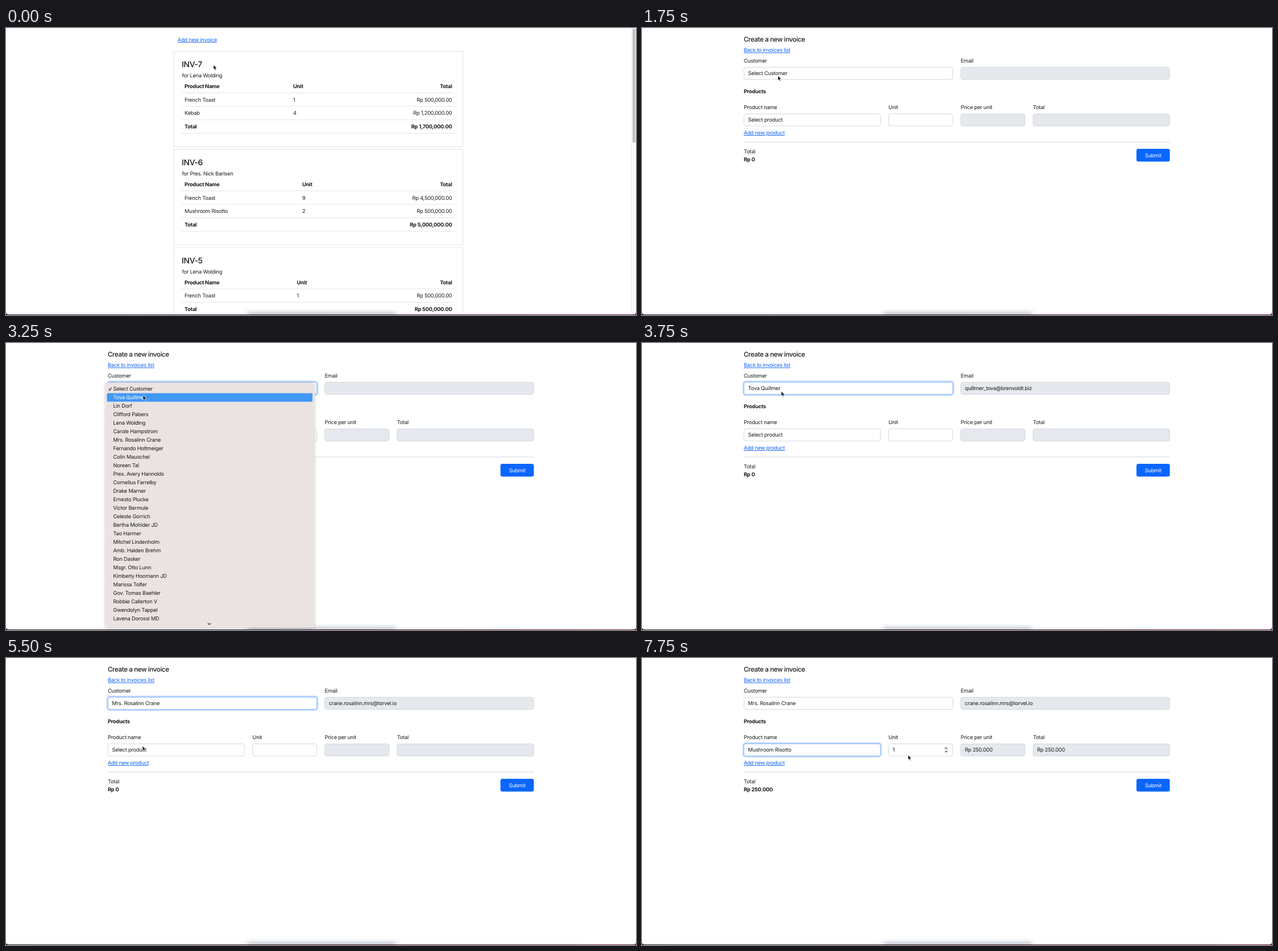
An HTML page that plays this animation: 1108x506 px, repeating every 8 s.

```html
<!DOCTYPE html>
<html lang="en">
<head>
<meta charset="utf-8">
<title>Invoices</title>
<style>
  html, body { margin: 0; width: 100%; height: 100%; overflow: hidden; background: #fff; }
  svg { display: block; width: 100%; height: 100%; }
  text { font: 400 9.25px Inter, "Liberation Sans", sans-serif; letter-spacing: -.023em;
         fill: #16191c; white-space: pre; text-rendering: geometricPrecision; }
  .b { font-weight: 700; }
  .link { fill: #0a60f8; text-decoration: underline; }
  .h4 { font-size: 13.9px; font-weight: 500; }
  .h5 { font-size: 11.6px; font-weight: 500; letter-spacing: -.034em; }
  .w { fill: #fff; }
  .end { text-anchor: end; }
  .mid { text-anchor: middle; }
</style>
</head>
<body>
<svg id="stage" viewBox="0 0 1108 506">
  <defs>
    <filter id="blur" x="-20%" y="-200%" width="140%" height="500%"><feGaussianBlur stdDeviation="5 3"/></filter>
    <filter id="shade" x="-10%" y="-10%" width="120%" height="120%">
      <feDropShadow dx="0" dy="1" stdDeviation="2.2" flood-opacity=".26"/>
    </filter>
    <clipPath id="list"><rect width="1108" height="489.5"/></clipPath>
    <linearGradient id="edge"><stop stop-color="#26222a"/><stop offset="1" stop-color="#6b2038"/></linearGradient>
  </defs>
  <g id="page"></g>
  <rect x="424" y="500" width="262" height="12" fill="#b9bfcb" opacity=".75" filter="url(#blur)"/>
  <path d="M0 501Q0 505 5 505H1103Q1108 505 1108 501V506H0Z" fill="url(#edge)"/>
  <g id="menu"></g>
  <g id="pointer"></g>
</svg>
<script>
const STEP = 250, LOOP = 8000;

const customers = ["Select Customer", "Tova Quillmer", "Lin Dorf", "Clifford Pabers", "Lena Wolding",
  "Carole Hampstrom", "Mrs. Rosalinn Crane", "Fernando Holtmeiger", "Colin Mauschel", "Noreen Tal",
  "Pres. Avery Hannolds", "Cornelius Farrelby", "Drake Marner", "Ernesto Plucke", "Victor Bermule",
  "Celeste Gorrich", "Bertha Mohlder JD", "Tao Harmer", "Mitchel Lindenholm", "Amb. Halden Brehm",
  "Ron Dasker", "Msgr. Otto Lunn", "Kimberly Hoomann JD", "Marissa Tolfer", "Gov. Tomas Baehler",
  "Robbie Callerton V", "Gwendolyn Tappel", "Lavena Dorossi MD", "Darnell Hulow"];
const products = ["Select product", "Mushroom Risotto", "French Toast", "Kebab", "Peking Duck", "Stinky Tofu",
  "Pork Sausage Roll", "Chicken Parm", "Barbecue Ribs", "Ebiten maki", "Pho", "Tuna Sashimi", "Pasta Carbonara",
  "Poutine", "Pork Belly Buns", "Scotch Eggs", "Chicken Fajitas", "Salmon Nigiri", "Linguine with Clams",
  "Pizza", "Cheeseburger", "Tacos"];

// [step, x, y] of the pointer tip
const moves = [[0, 365, 65], [1, 350, 42], [2, 336, 20], [4, 320, 32], [5, 285, 52], [6, 252, 72], [7, 239, 84],
  [8, 239, 82], [13, 241, 92], [14, 243, 90], [15, 245, 85], [17, 244, 82], [18, 242, 118], [19, 240, 155],
  [24, 239, 158], [25, 238, 162], [27, 238, 168], [28, 238, 176], [29, 300, 174], [30, 400, 172], [31, 468, 171]];

const menus = [
  { from: 9, to: 14, items: customers, top: 70, right: 542.5, checked: 0 },
  { from: 17, to: 22, items: customers, top: 55, right: 542.5, checked: 1 },
  { from: 26, to: 29, items: products, top: 152.3, right: 415, checked: 0 }];

const text = (x, y, s, cls = "") => `<text x="${x}" y="${y}" class="${cls}">${s}</text>`;
const rect = (x, y, w, h, attrs) => `<rect x="${x}" y="${y}" width="${w}" height="${h}" ${attrs}/>`;
const rule = (x1, x2, y, color = "#dee2e6") => `<path d="M${x1} ${y}H${x2}" stroke="${color}" stroke-width=".9"/>`;

function card(y, id, who, unitX, rows, total) {
  const line = (i, cells, cls) => {
    const base = y + 65 + i * 23.7;
    return text(314, base, cells[0], cls) + text(unitX, base, cells[1], cls) +
      text(784.5, base, cells[2], cls + " end") + rule(309, 789.5, base + 8.4);
  };
  return rect(295.3, y + .5, 508.2, 44.5 + 23.7 * (rows.length + 2) + 28.5, 'fill="#fff" stroke="#dee0e2" stroke-width=".9"') +
    text(309, y + 28, id, "h4") + text(309.5, y + 46.3, "for " + who) +
    line(0, ["Product Name", "Unit", "Total"], "b") +
    rows.map((r, i) => line(i + 1, r, "")).join("") +
    line(rows.length + 1, ["Total", "", total], "b");
}

function listPage() {
  const toast = ["French Toast", 1, "Rp 500,000.00"];
  return text(302, 23.8, "Add new invoice", "link") +
    card(41, "INV-7", "Lena Wolding", 505, [toast, ["Kebab", 4, "Rp 1,200,000.00"]], "Rp 1,700,000.00") +
    card(213.8, "INV-6", "Pres. Nick Barlsen", 521,
      [["French Toast", 9, "Rp 4,500,000.00"], ["Mushroom Risotto", 2, "Rp 500,000.00"]], "Rp 5,000,000.00") +
    card(386.6, "INV-5", "Lena Wolding", 511.5, [toast], "Rp 500,000.00") +
    rect(1100, 0, 8, 506, 'fill="#fafafa"') + rect(1100, 0, .8, 506, 'fill="#e6e6e6"') +
    rect(1102, 1, 5, 201.5, 'rx="2.5" fill="#c1c1c1"');
}

function field(x, y, w, value, { off, focus } = {}) {
  const ring = focus ? rect(x - 1, y - 1, w + 2, 24, 'rx="4.5" fill="none" stroke="#0d6efd" stroke-opacity=".28" stroke-width="2.4"') : "";
  return ring + rect(x + .4, y + .4, w - .8, 21.4,
    `rx="3.5" fill="${off ? "#e5e9ed" : "#fff"}" stroke="${focus ? "#86b7fe" : "#ced4da"}" stroke-width=".9"`) +
    text(x + 7.5, y + 14.3, value);
}

function formPage(k) {
  const chosen = k < 14 ? 0 : k < 22 ? 1 : 6;
  const email = k < 15 ? "" : k < 22 ? "quillmer_tova@brenvoldt.biz" : "crane.rosalinn.mrs@torvel.io";
  const picked = k >= 29, price = picked ? "Rp 250.000" : "";
  const spinner = k < 31 ? "" : rect(531, 155, 8, 14, 'rx="1.5" fill="#efefef"') +
    '<path d="M533 160l2-2.6 2 2.6zM533 164l2 2.6 2-2.6z" fill="#444"/>';
  return text(179, 24.4, "Create a new invoice", "h5") + text(179, 42.3, "Back to invoices list", "link") +
    text(179, 60.8, "Customer") + text(560.5, 60.8, "Email") +
    field(179, 68.8, 368, customers[chosen], { focus: k >= 9 && k < 25 }) +
    field(560.3, 68.8, 368, email, { off: true }) +
    text(179, 115.2, "Products", "b") +
    text(179, 143, "Product name") + text(433.5, 143, "Unit") +
    text(560.5, 143, "Price per unit") + text(687.7, 143, "Total") +
    field(179, 151, 240.7, products[+picked], { focus: k >= 26 }) +
    field(433.2, 151, 113.6, picked ? "1" : "") + spinner +
    field(560.3, 151, 113.6, price, { off: true }) + field(687.5, 151, 240.8, price, { off: true }) +
    text(179, 188, "Add new product", "link") + rule(179, 928, 200.9, "#cfd1d3") +
    text(179, 221, "Total") + text(179, 235, picked ? price : "Rp 0", "b") +
    rect(869.6, 213, 58.7, 22.6, 'rx="3.5" fill="#0b66fd"') + text(899, 227.8, "Submit", "w mid");
}

function menuView({ items, top, right, checked }, y) {
  const first = top + 3.5, hover = Math.floor((y - first) / 15), mid = (174.5 + right) / 2 - 1;
  const rows = items.map((name, i) => {
    const on = i === hover, row = first + i * 15;
    return (on ? rect(177.5, row, right - 181, 15, 'rx="2" fill="#4098f7"') : "") +
      (i === checked ? `<path d="M180.8 ${row + 7.9}l1.6 2.2 3-5" fill="none" stroke="${on ? "#fff" : "#16191c"}" stroke-width="1.1"/>` : "") +
      text(188.5, row + 10.6, name, on ? "w" : "");
  });
  return rect(174.5, top, right - 174.5, 501.7 - top, 'rx="4" fill="#ece4e3" fill-opacity=".97" filter="url(#shade)"') +
    `<g clip-path="url(#list)">${rows.join("")}</g>` +
    `<path d="M${mid - 2.6} 493.8l2.6 2.6 2.6-2.6" fill="none" stroke="#222" stroke-width="1.1"/>`;
}

function pointerView(k, x, y) {
  const hand = k === 2 || k === 3;
  const d = hand
    ? "M0 0Q1 -1 1.6 .2V3.2L5 4Q6 4.4 5.8 5.6L5 9H.6L-2 5.6Q-2 4.4 -1 4.8L0 5.6Z"
    : "M0 0V8.4L1.9 6.7 3.3 9.8 4.7 9.2 3.3 6.2H5.9Z";
  const look = hand ? 'fill="#fff" stroke="#000"' : 'fill="#000" stroke="#fff"';
  return `<path transform="translate(${x} ${y})" d="${d}" ${look} stroke-width=".7"/>`;
}

const [page, menu, pointer] = ["page", "menu", "pointer"].map(id => document.getElementById(id));
let shown = -1;

function draw(k) {
  const [, x, y] = moves.findLast(m => m[0] <= k);
  const open = menus.find(m => k >= m.from && k < m.to);
  page.innerHTML = k < 4 ? listPage() : formPage(k);
  menu.innerHTML = open ? menuView(open, y) : "";
  pointer.innerHTML = pointerView(k, x, y);
}

const start = performance.now();
function tick() {
  const k = Math.floor((performance.now() - start) % LOOP / STEP);
  if (k !== shown) draw(shown = k);
  requestAnimationFrame(tick);
}
tick();
</script>
</body>
</html>
```
